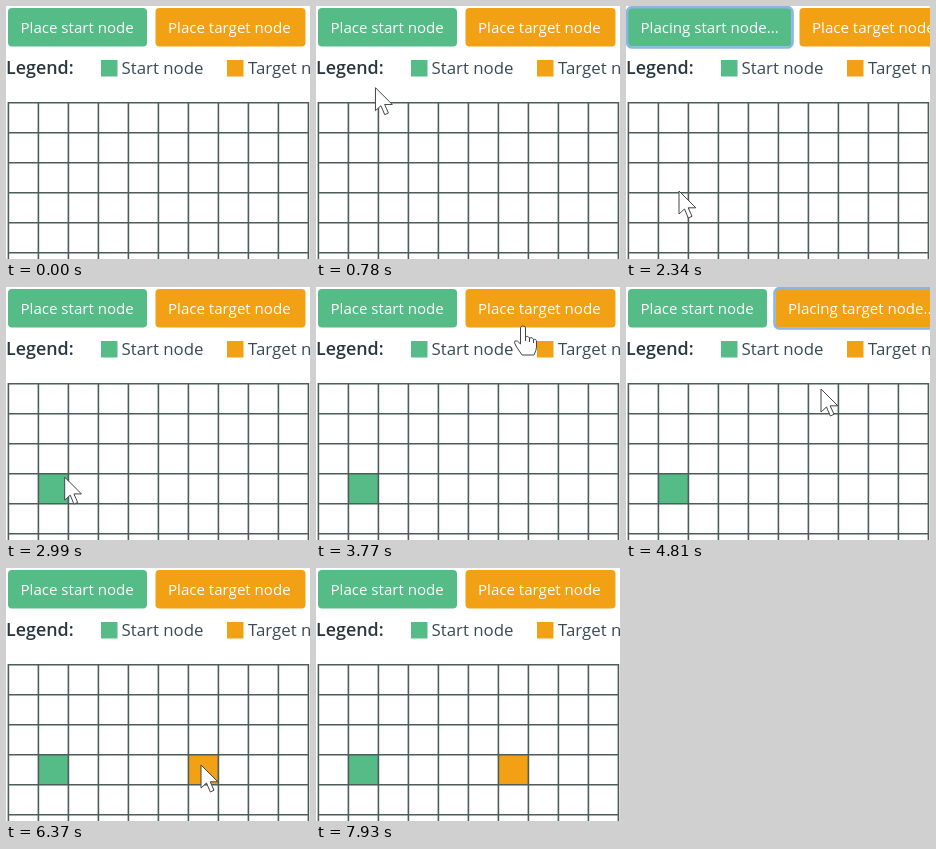
These frames come from a looping animation (304 px wide and 253 px high, 8060 ms). An HTML page:

```html
<!DOCTYPE html>
<html lang="en">
<head>
<meta charset="utf-8">
<title>Placing nodes on a grid</title>
<style>
  html, body { margin: 0; height: 100%; overflow: hidden; background: #fff; }
  svg { display: block; width: 100vw; height: 100vh; }
  text { font-family: "Open Sans", "Noto Sans", sans-serif; white-space: pre; }
  .button text { font-size: 15.1px; fill: #fff; }
  .legend { font-size: 16.85px; fill: #3a4a52; }
  .title { font-size: 17.9px; font-weight: 600; fill: #2a373e; }
  .green { fill: #55bb87; }
  .orange { fill: #f2a014; }
  .ring { fill: none; stroke: #8ab6e6; stroke-width: 2.6; }
  .grid { fill: none; stroke: #4d5d5a; stroke-width: 1.6; }
  .cursor { fill: #fff; stroke: #454545; stroke-linejoin: round; }
</style>
</head>
<body>
<svg viewBox="0 0 304 253">
  <g class="button" id="startButton">
    <rect class="green" y="2" height="38.5" rx="4"/>
    <rect class="ring" x="-1" y="1.2" height="40.3" rx="5"/>
    <text x="12.5" y="27"></text>
  </g>
  <g class="button" id="targetButton">
    <rect class="orange" y="2" height="38.5" rx="4"/>
    <rect class="ring" x="-1" y="1.2" height="40.3" rx="5"/>
    <text x="12.5" y="27"></text>
  </g>

  <text class="title" x="0" y="68">Legend:</text>
  <rect class="green" x="95" y="54" width="16.5" height="16.5"/>
  <text class="legend" x="115.5" y="68">Start node</text>
  <rect class="orange" x="221" y="54" width="16.5" height="16.5"/>
  <text class="legend" x="242" y="68">Target node</text>

  <rect class="green" id="startCell" x="32" y="187" width="30" height="30"/>
  <rect class="orange" id="targetCell" x="182" y="187" width="30" height="30"/>
  <path class="grid" id="grid"/>

  <g class="cursor" id="cursor">
    <path id="arrow" d="M0 0V23L5.5 18 9.3 27 13 25.3 9.2 16.8H16.8Z"/>
    <path id="hand" d="M-2.5 2Q-2.5 0 0 0T2.5 2V11Q5 9 6.5 12Q9.5 10.5 10.5 13.5Q13.5 12.5 13.5 16V21Q13.5 24 11 29H-1L-7 20Q-9.5 16 -8 15Q-6 13.5 -2.5 18ZM2.5 11V15M6.5 12V16M10.5 13.5V17"/>
  </g>
</svg>
<script>
const LOOP = 8060, STEP = 130;
const START_CLICK = 1430, START_PLACED = 2730;
const TARGET_CLICK = 4290, TARGET_PLACED = 6110;

// Pointer tip: [time, x, y]
const route = [
  [390, 75, 221], [1040, 51, 6], [1560, 51, 6], [2340, 53, 185],
  [2600, 50, 199], [2860, 50, 199], [3770, 207, 39], [4030, 205, 28],
  [4420, 205, 28], [4810, 195, 102], [5850, 195, 197], [6370, 195, 197],
  [6630, 197, 230], [6760, 198, 260]
];

const byId = id => document.getElementById(id);
const show = (node, visible) => node.setAttribute('visibility', visible ? 'inherit' : 'hidden');

let lines = '';
for (let i = 0; i <= 10; i++) lines += `M${2.4 + 30 * i} 96V253`;
for (let i = 0; i <= 5; i++) lines += `M1.6 ${96.8 + 30 * i}H303.2`;
byId('grid').setAttribute('d', lines);

function drawButton(id, x, width, label, focused) {
  const button = byId(id);
  const [face, ring] = button.querySelectorAll('rect');
  button.setAttribute('transform', `translate(${x} 0)`);
  face.setAttribute('width', width);
  ring.setAttribute('width', width + 2);
  show(ring, focused);
  button.querySelector('text').textContent = label;
}

function pointerAt(time) {
  const next = route.findIndex(point => point[0] > time);
  if (next < 1) return null;
  const [t0, x0, y0] = route[next - 1], [t1, x1, y1] = route[next];
  const p = (time - t0) / (t1 - t0);
  const eased = p * p * (3 - 2 * p);
  return [x0 + (x1 - x0) * eased, y0 + (y1 - y0) * eased];
}

function draw(time) {
  const placingStart = time >= START_CLICK && time < START_PLACED;
  const placingTarget = time >= TARGET_CLICK && time < TARGET_PLACED;

  drawButton('startButton', 2, placingStart ? 163.5 : 139,
    placingStart ? 'Placing start node...' : 'Place start node', placingStart);
  drawButton('targetButton', placingStart ? 173.5 : 149.5, placingTarget ? 174 : 150,
    placingTarget ? 'Placing target node...' : 'Place target node', placingTarget);

  show(byId('startCell'), time >= START_PLACED);
  show(byId('targetCell'), time >= TARGET_PLACED);

  const tip = pointerAt(time);
  show(byId('cursor'), tip);
  if (tip) {
    const overButton = tip[1] < 41;
    byId('cursor').setAttribute('transform', `translate(${tip})`);
    show(byId('hand'), overButton);
    show(byId('arrow'), !overButton);
  }
}

function tick() {
  const time = performance.now() % LOOP;
  draw(Math.floor(time / STEP) * STEP);
  requestAnimationFrame(tick);
}
tick();
</script>
</body>
</html>
```
